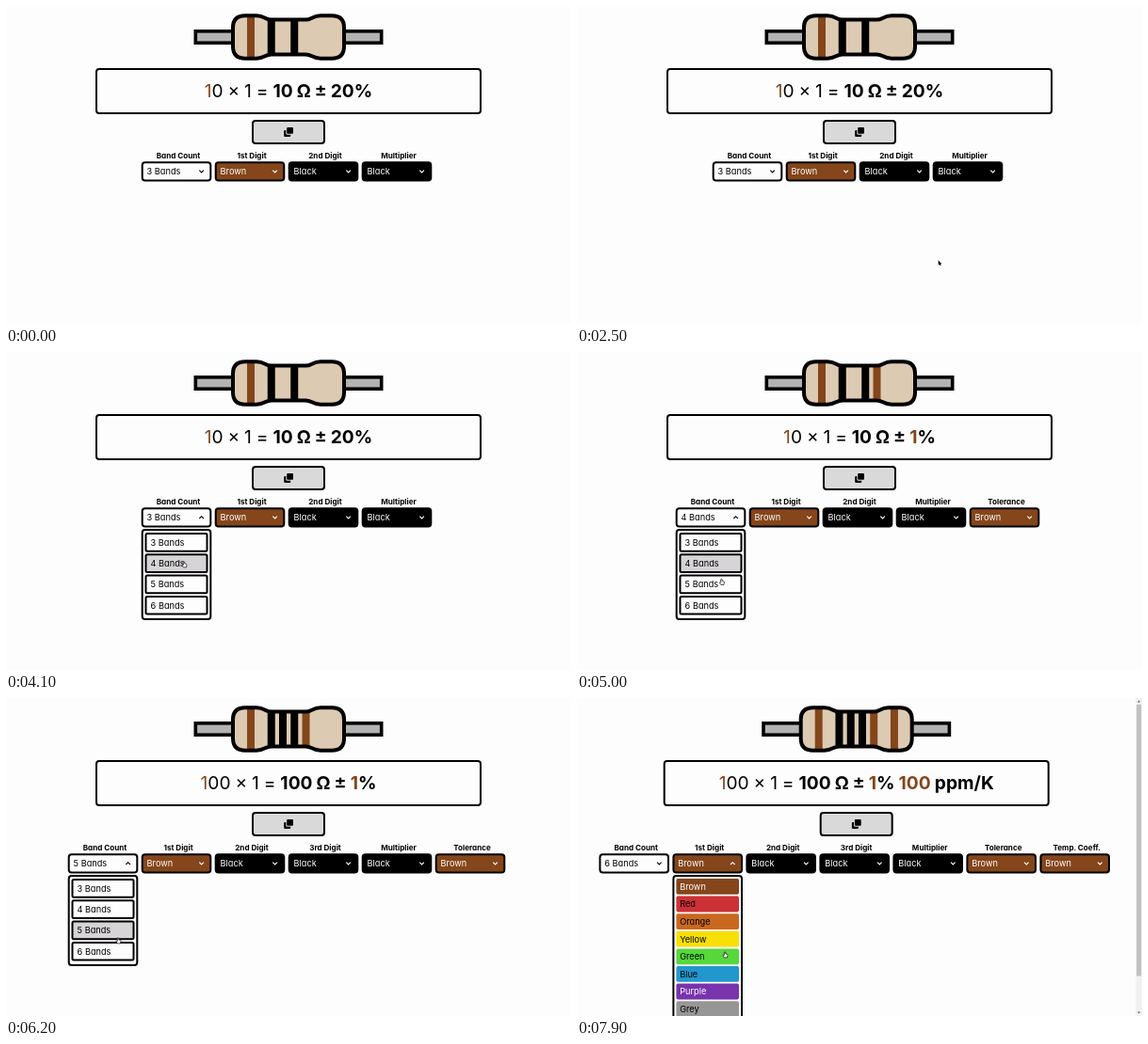
These frames come from a looping animation (600 by 338 pixels, 8000 ms). An HTML page:

```html
<!DOCTYPE html>
<html lang="en">
<head>
<meta charset="utf-8">
<title>Resistor calculator</title>
<style>
  html, body { margin: 0; width: 100%; height: 100%; overflow: hidden; background: #fefdfe; }
  svg { position: absolute; left: 0; top: 0; width: 600px; height: 338px; display: block; }
  text { font-family: Inter, "Open Sans", sans-serif; font-feature-settings: "cv11"; }
  .value { font-size: 19.2px; word-spacing: -.5px; text-anchor: middle; }
  .value .b { font-weight: 700; }
  .label { font-size: 8.1px; font-weight: 700; text-anchor: middle; }
  .item { font-size: 9.2px; }
</style>
</head>
<body>
<svg viewBox="0 0 600 338">
  <defs>
    <path id="body" d="M241 23Q241 10.3 254 10.3H266C275 10.3 275 14.6 282 14.6H318C325 14.6 325 10.3 334 10.3H346Q359 10.3 359 23V43Q359 55.7 346 55.7H334C325 55.7 325 51.4 318 51.4H282C275 51.4 275 55.7 266 55.7H254Q241 55.7 241 43Z"/>
    <clipPath id="inside"><use href="#body"/></clipPath>
  </defs>
  <g id="page"></g>
  <path id="arrow" d="M0 0V5.2L1.2 4.2L2 6L2.9 5.6L2.1 3.9H3.6Z" stroke="#fff" stroke-width=".8" paint-order="stroke"/>
  <path id="hand" d="M-.7 3.6V.6Q0-.4.7.6V2.3L2.6 2.9Q3.1 3.1 3 3.8L2.5 6.4H-.6L-2.1 4.2Q-1.9 3.2-.7 3.9Z" fill="#fff" stroke="#111" stroke-width=".75"/>
</svg>
<script>
const LOOP = 8000, PITCH = 78, ROW = 22.3, MENU_TOP = 192;
const BROWN = '#84461a', BLACK = '#000', WHITE = '#fefdfe';
const [page, arrow, hand] = ['page', 'arrow', 'hand'].map(id => document.getElementById(id));

const COLORS = {
  Brown: BROWN, Red: '#cd3037', Orange: '#c9681f', Yellow: '#f8df06',
  Green: '#56d83b', Blue: '#2297cd', Purple: '#7933ad', Grey: '#969696'
};

// Label, colour name, smallest band count that shows the band
const BANDS = [
  ['1st Digit', 'Brown', 3], ['2nd Digit', 'Black', 3], ['3rd Digit', 'Black', 5],
  ['Multiplier', 'Black', 3], ['Tolerance', 'Brown', 4], ['Temp. Coeff.', 'Brown', 6]
].map(([label, name, min], i) => ({
  label, name, min,
  color: name === 'Brown' ? BROWN : BLACK,
  // Even spacing, with the outer two pushed into the bulbs
  x: 265.5 + 12.25 * i + (i === 0 ? -9.5 : i === 5 ? 9.5 : 0)
}));

// Each click adds a band; later the digit menu opens
const CLICKS = [4400, 5250, 6450], DIGIT_OPEN = 7330, HOVER_LAG = 250;

// Pointer stops: time, x, y
const STOPS = [
  [1950, 577, 328], [2500, 384, 270.5], [3150, 207, 185], [3400, 190, 177],
  [3850, 189, 221], [4100, 189, 222.5], [5000, 153.5, 241], [5250, 136, 244],
  [6200, 119, 254.5], [6450, 119, 264], [6700, 136.5, 247.5],
  [DIGIT_OPEN, 140, 184], [7900, 157, 269.5]
];

const rect = (x, y, w, h, fill, r = 0) =>
  `<rect x="${x}" y="${y}" width="${w}" height="${h}" rx="${r}" fill="${fill}"/>`;

// Bordered box given by its outer edges
const box = (x, y, w, h, fill, line = 2, r = 3) =>
  `<rect x="${x + line / 2}" y="${y + line / 2}" width="${w - line}" height="${h - line}" rx="${r}" fill="${fill}" stroke="#000" stroke-width="${line}"/>`;

// Text whose capitals are centred on cy
const text = (cls, x, cy, size, body, fill = BLACK) =>
  `<text class="${cls}" x="${x}" y="${cy + size * .364}" fill="${fill}">${body}</text>`;

const bold = (body, fill = BLACK) => `<tspan class="b" fill="${fill}">${body}</tspan>`;

const firstColumn = n => 300 - PITCH / 2 * (n + 1);

function resistor(bands) {
  const lead = x => box(x, 25, 46, 16, '#b3b3b3', 3.6, 0);
  const stripes = bands.map(b => rect(b.x, 8, 8, 50, b.color)).join('');
  return lead(199.5) + lead(354.5) +
    `<use href="#body" fill="#ddcab3"/><g clip-path="url(#inside)">${stripes}</g>` +
    '<use href="#body" fill="none" stroke="#000" stroke-width="4"/>';
}

function formula(n) {
  const zeros = n > 4 ? '00' : '0';
  let s = `<tspan fill="${BROWN}">1</tspan>${zeros} × 1 = ` + bold(`1${zeros} Ω ± `);
  s += n > 3 ? bold('1', BROWN) + bold('%') : bold('20%');
  if (n > 5) s += bold(' 100', BROWN) + bold(' ppm/K');
  return box(95, 66, 410, 49, WHITE) + text('value', 300, 90.5, 19.2, s);
}

const copyButton = () => box(261, 121, 78, 26, '#d9d9d9') +
  rect(295.2, 132, 7, 7, BLACK, 1) + rect(297.3, 128.2, 8.6, 8.6, '#d9d9d9', 1.2) +
  rect(298.2, 129, 6.8, 6.8, BLACK, 1);

function select(x, label, value, fill, ink, open) {
  const tip = open ? 'l2.3-2.3l2.3 2.3' : 'l2.3 2.3l2.3-2.3';
  return text('label', x + PITCH / 2, 159.3, 8.1, label) + box(x - .3, 165.3, 74.6, 21.2, fill) +
    text('item', x + 5.6, 175.8, 9.2, value, ink) +
    `<path d="M${x + 61.3} ${open ? 177 : 174.6}${tip}" fill="none" stroke="${ink}" stroke-width="1.1"/>`;
}

function countMenu(x, hot) {
  let s = box(x - .3, 188, 74.6, 97, WHITE);
  for (let i = 0; i < 4; i++) {
    const y = MENU_TOP + i * ROW;
    s += box(x + 3.5, y, 67, 20.7, i === hot ? '#d6d4d6' : WHITE, 2, 1.5) +
      text('item', x + 9.6, y + 10.3, 9.2, `${i + 3} Bands`);
  }
  return s;
}

function colorMenu(x) {
  const rows = Object.entries(COLORS).map(([name, fill], i) => {
    const y = MENU_TOP + i * 18.6;
    const ink = name === 'Brown' || name === 'Purple' ? '#fff' : BLACK;
    return rect(x + 3.7, y, 66.6, 16.8, fill, 1.8) + text('item', x + 7.5, y + 8.5, 9.2, name, ink);
  });
  return box(x - .3, 188, 74.6, 190, WHITE) + rows.join('');
}

const scrollbar = () => rect(593.3, 0, 6.7, 338, '#f1f1f1') + rect(594.2, 7, 5, 288.5, '#c1c1c1') +
  '<path d="M595.2 4.4L596.7 2.6L598.2 4.4ZM595.2 333.6L596.7 335.4L598.2 333.6Z" fill="#555"/>';

function draw(n, open, hot) {
  const bands = BANDS.filter(b => n >= b.min);
  const left = firstColumn(n);
  let s = resistor(bands) + formula(n) + copyButton() +
    select(left, 'Band Count', `${n} Bands`, WHITE, BLACK, open === 0);
  bands.forEach((b, i) => {
    s += select(left + PITCH * (i + 1), b.label, b.name, b.color, '#fff', open === i + 1);
  });
  if (open === 0) s += countMenu(left, hot);
  if (open === 1) s += colorMenu(left + PITCH);
  // The long menu brings in the scrollbar, which narrows the page
  page.innerHTML = open === 1 ? `<g transform="translate(-3.3 0)">${s}</g>` + scrollbar() : s;
}

function pointer(t) {
  const next = STOPS.findIndex(p => p[0] > t);
  if (next < 0) return STOPS[STOPS.length - 1].slice(1);
  if (next === 0) return null;
  const [t0, x0, y0] = STOPS[next - 1], [t1, x1, y1] = STOPS[next];
  const k = (t - t0) / (t1 - t0);
  return [x0 + (x1 - x0) * k, y0 + (y1 - y0) * k];
}

// The count menu is open while the pointer is over its column
function openColumn(t, n, at) {
  if (t >= DIGIT_OPEN) return 1;
  if (!at) return -1;
  const dx = at[0] - firstColumn(n);
  return dx >= 0 && dx <= 74 && at[1] > 165 && at[1] < 285 ? 0 : -1;
}

let shown = '';
function render(t) {
  const n = 3 + CLICKS.filter(c => c <= t).length;
  const at = pointer(t), open = openColumn(t, n, at);
  const hot = open === 0 ? Math.floor((pointer(t - HOVER_LAG)[1] - MENU_TOP) / ROW) : -1;
  const key = [n, open, hot].join();
  if (key !== shown) {
    draw(n, open, hot);
    shown = key;
  }
  arrow.style.display = at && open < 0 ? '' : 'none';
  hand.style.display = at && open >= 0 ? '' : 'none';
  if (at) (open < 0 ? arrow : hand).setAttribute('transform', `translate(${at})`);
}

const start = performance.now();
function tick() {
  render((performance.now() - start) % LOOP);
  requestAnimationFrame(tick);
}
tick();
</script>
</body>
</html>
```
